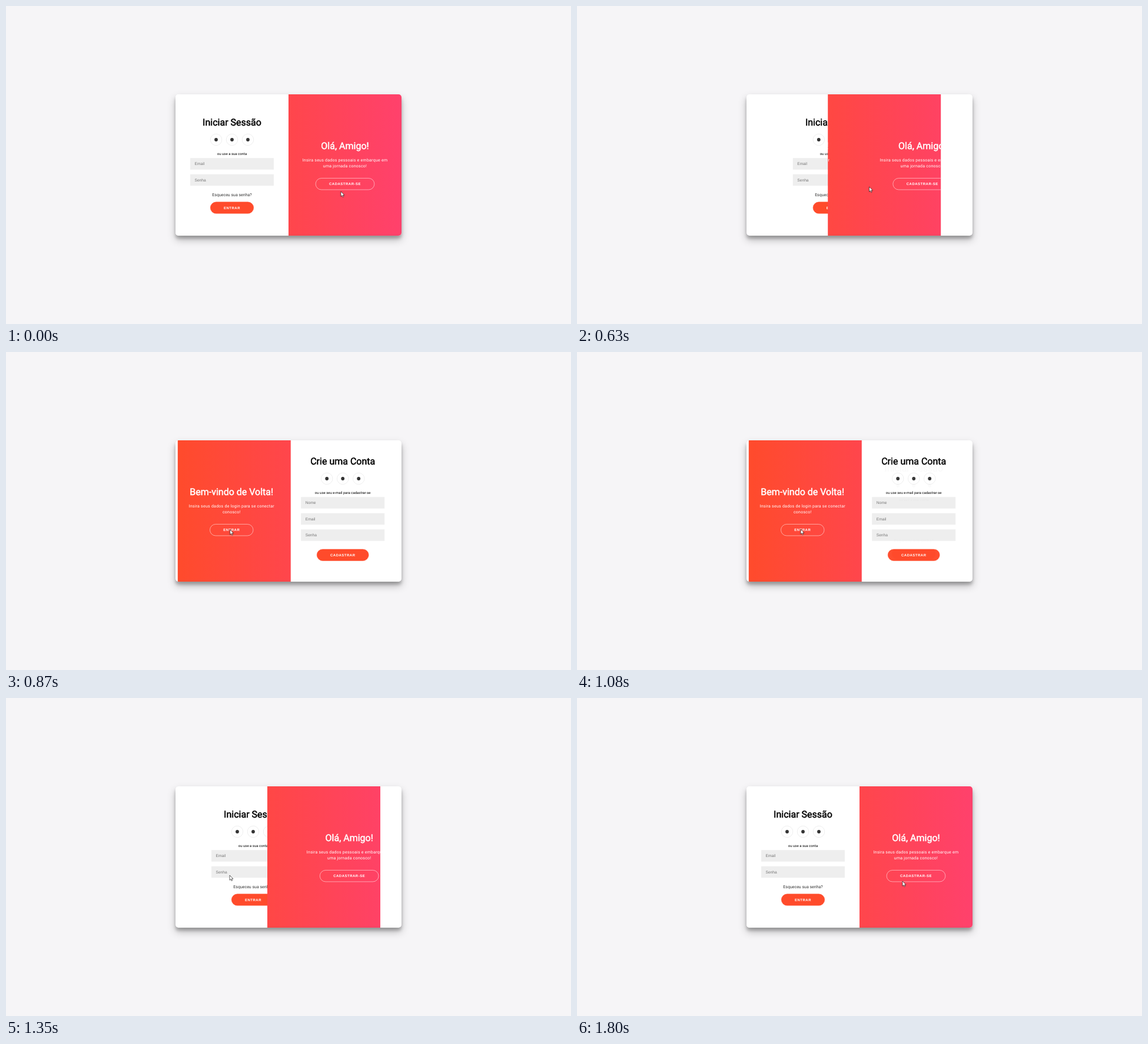
An HTML page that plays this animation: 960x540 px, repeating every 1.83 s.

```html
<!DOCTYPE html>
<html lang="pt">
<head>
<meta charset="utf-8">
<title>Iniciar Sessão</title>
<style>
  html, body { margin: 0; width: 100%; height: 100%; overflow: hidden; background: #f6f5f7; }
  .card {
    position: absolute; left: 288px; top: 150px; width: 384px; height: 240px;
    border-radius: 5px; background: #fff;
    box-shadow: 0 7px 14px rgba(0,0,0,.25), 0 5px 5px rgba(0,0,0,.22);
  }
  svg { position: absolute; left: 0; top: 0; display: block; }
  text { font-family: Roboto, sans-serif; text-anchor: middle; text-rendering: geometricPrecision; }
  .title { font-size: 16px; stroke-width: .5px; }
  .lead { font-size: 7px; letter-spacing: .25px; fill: #fff; }
  .note { font-size: 6px; }
  .link { font-size: 7px; fill: #333; }
  .label { font: bold 6px "Liberation Sans", Arial, sans-serif; letter-spacing: .5px; fill: #fff; }
  .hint { font: 6.667px "Liberation Sans", Arial, sans-serif; text-anchor: start; fill: #757575; }
</style>
</head>
<body>
<div class="card"></div>
<svg width="960" height="540" viewBox="0 0 960 540">
  <defs>
    <linearGradient id="warm" gradientUnits="userSpaceOnUse" x1="288" y1="0" x2="672" y2="0">
      <stop offset="0" stop-color="#ff4b2b"/>
      <stop offset="1" stop-color="#ff416c"/>
    </linearGradient>
    <clipPath id="cardClip"><rect x="288" y="150" width="384" height="240" rx="5"/></clipPath>
    <clipPath id="overlayClip"><rect id="window" y="150" width="192" height="240"/></clipPath>
  </defs>
  <g clip-path="url(#cardClip)">
    <g id="forms"><g id="signUp"></g><g id="signIn"></g></g>
    <g clip-path="url(#overlayClip)">
      <rect x="288" y="150" width="384" height="240" fill="url(#warm)"/>
      <g id="leftPanel"></g>
      <g id="rightPanel"></g>
    </g>
  </g>
  <path id="cursor" d="M0 0V8.4L1.9 6.6L3.2 9.5L4.6 8.9L3.3 6.1H6Z" fill="#fff" stroke="#000" stroke-width=".6"/>
</svg>
<script>
const $ = id => document.getElementById(id);
const LOOP = 1830, STEP = 30, SLIDE = 450, TO_LEFT = 465, TO_RIGHT = 1035;

const text = (cls, x, y, s, attrs = '') => `<text class="${cls}" x="${x}" y="${y}" ${attrs}>${s}</text>`;
const title = (x, y, s, color) => text('title', x, y, s, `fill="${color}" stroke="${color}"`);

function button(x, y, width, label, ghost) {
  const paint = ghost ? 'fill="none" stroke="#fff"' : 'fill="#ff4b2b" stroke="#ff4b2b"';
  return `<g class="button"><rect x="${x - width / 2 + .25}" y="${y + .25}" width="${width - .5}" height="19.5" rx="9.75" ${paint} stroke-width=".5"/>`
    + text('label', x, y + 12.1, label) + '</g>';
}

function form(top, heading, note, fields) {
  const dots = [357, 384, 411].map(x =>
    `<circle cx="${x}" cy="${top + 39}" r="9.75" fill="none" stroke="#ddd" stroke-width=".5"/>
     <circle cx="${x}" cy="${top + 39}" r="2.9" fill="#333"/>`).join('');
  const inputs = fields.map((name, i) => {
    const y = top + 70.25 + i * 27.5;
    return `<rect x="313" y="${y}" width="142" height="19.5" fill="#eee"/>` + text('hint', 320.5, y + 12.1, name);
  }).join('');
  return '<rect x="288" y="150" width="192" height="240" fill="#fff"/>'
    + title(384, top + 15, heading, '#000') + dots + text('note', 384, top + 64.5, note) + inputs;
}

function panel(x, heading, lines, label, width) {
  return title(x, 243.2, heading, '#fff')
    + lines.map((s, i) => text('lead', x, 264.4 + i * 10, s)).join('')
    + button(x, 292.2, width, label, true);
}

$('signUp').innerHTML = form(176, 'Crie uma Conta', 'ou use seu e-mail para cadastrar-se', ['Nome', 'Email', 'Senha'])
  + button(384, 334.7, 88.5, 'CADASTRAR');
$('signIn').innerHTML = form(188, 'Iniciar Sessão', 'ou use a sua conta', ['Email', 'Senha'])
  + text('link', 384, 323.3, 'Esqueceu sua senha?') + button(384, 332.6, 74, 'ENTRAR');
$('leftPanel').innerHTML = panel(384, 'Bem-vindo de Volta!',
  ['Insira seus dados de login para se conectar', 'conosco!'], 'ENTRAR', 74);
$('rightPanel').innerHTML = panel(576, 'Olá, Amigo!',
  ['Insira seus dados pessoais e embarque em', 'uma jornada conosco!'], 'CADASTRAR-SE', 100.3);

const clamp = v => Math.min(1, Math.max(0, v));

// cubic-bezier(.42, 0, .58, 1)
function easeInOut(x) {
  let lo = 0, hi = 1;
  for (let i = 0; i < 30; i++) {
    const s = (lo + hi) / 2, r = 1 - s;
    if (3 * r * r * s * .42 + 3 * r * s * s * .58 + s * s * s < x) lo = s; else hi = s;
  }
  return lo * lo * (3 - 2 * lo);
}

// Linear path through [time, ...values] points
function along(points, t) {
  const i = Math.max(1, points.findIndex(p => p[0] >= t));
  const a = points[i - 1], b = points[i], k = clamp((t - a[0]) / (b[0] - a[0]));
  return a.slice(1).map((v, j) => v + (b[j + 1] - v) * k);
}

const cursorPath = [
  [0, 569, 315], [60, 581, 312], [150, 588, 308], [240, 589, 307], [540, 589, 307],
  [600, 548, 308], [660, 445, 306], [720, 387, 303], [750, 381, 302], [1080, 380, 301],
  [1530, 380, 301], [1620, 396, 308], [1710, 475, 312], [1800, 553, 311], [1830, 569, 315]
];
const rightPress = [[0, 1], [360, 1], [420, .95], [450, .95], [480, .97], [510, 1], [LOOP, 1]];
const leftPress = [[0, 1], [930, 1], [990, .95], [1020, .95], [1065, 1], [LOOP, 1]];

const shift = (id, x, y = 0) => $(id).setAttribute('transform', `translate(${x} ${y})`);
const press = (id, cx, s) => $(id).querySelector('.button')
  .setAttribute('transform', `translate(${cx} 302.2) scale(${s}) translate(${-cx} -302.2)`);

function render(t) {
  const out = clamp((t - TO_LEFT) / SLIDE), back = clamp((t - TO_RIGHT) / SLIDE);
  const returning = t >= TO_RIGHT;
  const p = returning ? 1 - easeInOut(back) : easeInOut(out);

  $('window').setAttribute('x', 480 - 192 * p);
  shift('signIn', 192 * p);
  shift('signUp', 192 * p);
  shift('leftPanel', -38.4 * (1 - p));
  shift('rightPanel', 38.4 * p);

  // Sign-up appears halfway out, then fades and drops behind on the way back
  $('signUp').setAttribute('opacity', returning ? p : out >= .5 ? 1 : 0);
  const front = (returning ? p > .375 : out >= .5) ? 'signUp' : 'signIn';
  if ($('forms').lastElementChild.id !== front) $('forms').append($(front));

  press('rightPanel', 576, along(rightPress, t)[0]);
  press('leftPanel', 384, along(leftPress, t)[0]);
  shift('cursor', ...along(cursorPath, t));
}

const start = performance.now();
function tick() {
  const t = (performance.now() - start) % LOOP;
  render(Math.floor(t / STEP) * STEP);
  requestAnimationFrame(tick);
}
tick();
</script>
</body>
</html>
```
